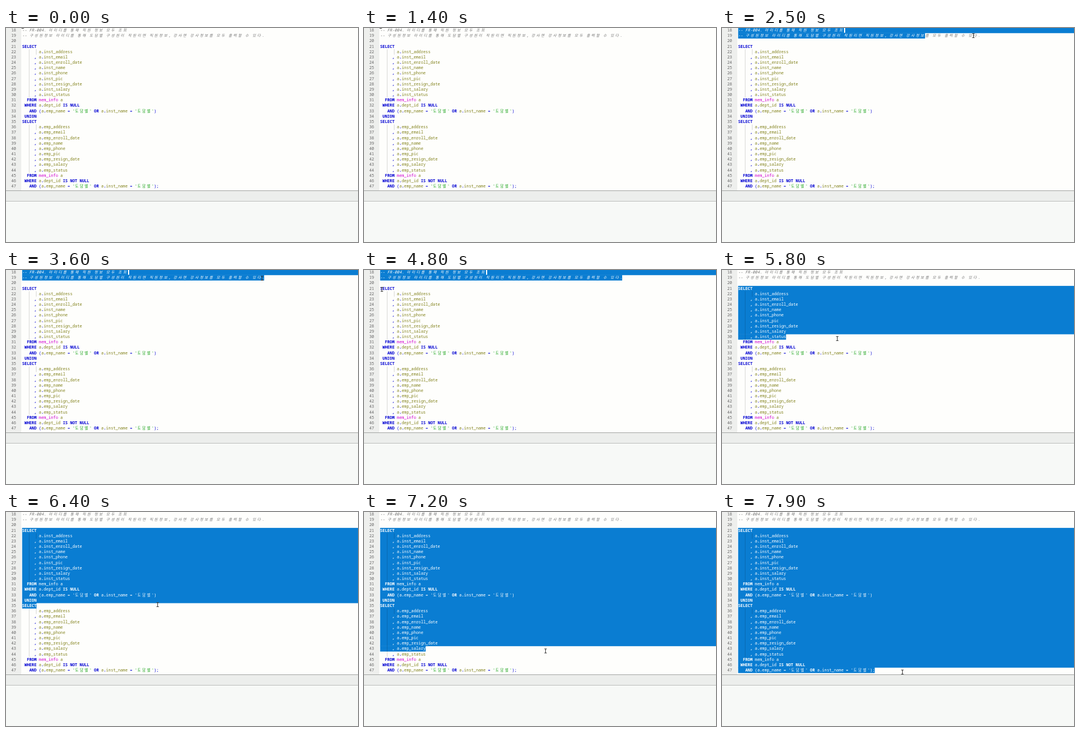
An HTML page with a canvas that plays this animation: 600 by 365 pixels, repeating every 8 s.

```html
<!DOCTYPE html>
<html lang="ko">
<head>
<meta charset="utf-8">
<style>
  html, body { margin: 0; width: 100%; height: 100%; overflow: hidden; background: #f7f9f7; }
  canvas { display: block; }
</style>
</head>
<body>
<canvas id="stage" width="600" height="365"></canvas>
<script>
const ctx = document.getElementById('stage').getContext('2d');
const LOOP = 8000, STEP = 100, LAG = 100;
const LEFT = 27.5, CELL = 4.085, TOP = -0.4, ROW = 9.17, FIRST = 18;
const BLUE = '#0a7dd2', PERSON = '도담별';
const LATIN = '6.81px "Noto Sans Mono", "DejaVu Sans Mono", monospace';
const HANGUL = '6.3px "Noto Sans CJK KR", "Noto Sans CJK", sans-serif';

const fields = ['address', 'email', 'enroll_date', 'name', 'phone', 'pic', 'resign_date', 'salary', 'status'];
const query = (prefix, test, end) => [
  'SELECT',
  ...fields.map((f, i) => `     ${i ? ',' : ' '} a.${prefix}_${f}`),
  '  FROM mem_info a',
  ` WHERE a.dept_id ${test}`,
  `   AND (a.emp_name = '${PERSON}' OR a.inst_name = '${PERSON}')${end}`
];
const source = [
  '-- FR-004. 아이디를 통해 직원 정보 모두 조회',
  `-- 구성원정보 아이디를 통해 ${PERSON} 구성원이 직원이면 직원정보, 강사면 강사정보를 모두 출력할 수 있다.`,
  '',
  ...query('inst', 'IS NULL', ''),
  ' UNION',
  ...query('emp', 'IS NOT NULL', ';')
];

const isHangul = c => c >= '가' && c <= '힣';

function tokenStyle(token) {
  if (token.startsWith('--')) return { color: '#757575', font: 'italic ' };
  if (token[0] === "'") return { color: '#12a012', font: '' };
  if (token === 'mem_info') return { color: '#d000d0', font: '' };
  if (/^[a-z_]+$/.test(token)) return { color: '#80801a', font: '' };
  return { color: '#0000d2', font: /[A-Z,.]/.test(token) ? 'bold ' : '' };
}

// Lay every character out on the cell grid; Hangul takes two cells.
function layout(text) {
  const chars = [];
  let x = LEFT;
  for (const token of text.match(/--.*|'[^']*'|\w+|\s+|./g) || []) {
    const style = tokenStyle(token);
    for (const c of token) {
      const w = isHangul(c) ? 2 * CELL : CELL;
      chars.push({ c, x, w, ...style });
      x += w;
    }
  }
  return chars;
}
const lines = source.map(layout);
const rowTop = i => TOP + i * ROW;

// Pointer path: time, x, y
const path = [
  [0, 28, -3], [1900, 28, -3], [2000, 32, 4], [2200, 130, 5], [2300, 215, 7],
  [2400, 346, 11], [2500, 428, 13], [2600, 450, 13], [2800, 458, 13], [3400, 458, 13],
  [3600, 436, 14], [4500, 40, 32], [4800, 30, 33], [5000, 30, 33], [5400, 90, 60],
  [5700, 185, 112], [5800, 196, 117], [6300, 250, 156], [6400, 258, 158],
  [7100, 303, 231], [7200, 309, 237], [7900, 307, 273], [8000, 307, 273]
];
function pointer(t) {
  const i = Math.max(1, path.findIndex(p => p[0] >= t));
  const [t0, x0, y0] = path[i - 1], [t1, x1, y1] = path[i];
  const k = (t - t0) / (t1 - t0);
  return { x: x0 + (x1 - x0) * k, y: y0 + (y1 - y0) * k };
}

function selection(t) {
  if (t < 2100) return null;
  const first = t < 5000;
  const p = pointer((first ? Math.min(t, 2800) : t) - LAG);
  const from = first ? 0 : 3;
  const to = Math.max(from, Math.min(lines.length - 1, Math.floor((p.y - TOP) / ROW)));
  let x = LEFT;
  for (const ch of lines[to]) if (p.x >= ch.x + ch.w / 2) x = ch.x + ch.w;
  return { from, to, x, first };
}

function rect(color, x, y, w, h) {
  ctx.fillStyle = color;
  ctx.fillRect(x, y, w, h);
}

function drawLine(line, i, selectedTo) {
  const y = rowTop(i) + 6.5;
  ctx.textAlign = 'center';
  for (const ch of line) {
    const mid = ch.x + ch.w / 2;
    const wide = isHangul(ch.c);
    ctx.fillStyle = mid < selectedTo ? '#fff' : ch.color;
    ctx.font = ch.font + (wide ? HANGUL : LATIN);
    ctx.fillText(ch.c, wide ? mid - 0.8 : mid, y);
  }
  ctx.font = LATIN;
  ctx.textAlign = 'right';
  ctx.fillStyle = '#646464';
  ctx.fillText(FIRST + i, 17.1, y);
}

function drawGuides() {
  for (const i of [4, 18]) {
    rect('rgba(0,0,0,.15)', 39, rowTop(i), 1, ROW * fields.length);
    rect('rgba(0,0,0,.15)', 51, rowTop(i), 1, ROW);
  }
}

function drawPointer({ x, y }) {
  x = Math.round(x);
  y = Math.round(y);
  ctx.strokeStyle = '#3a3a3a';
  ctx.lineWidth = 1;
  ctx.beginPath();
  ctx.moveTo(x - 1.5, y - 3.5);
  ctx.lineTo(x + 2.5, y - 3.5);
  ctx.moveTo(x + 0.5, y - 3.5);
  ctx.lineTo(x + 0.5, y + 3.5);
  ctx.moveTo(x - 1.5, y + 3.5);
  ctx.lineTo(x + 2.5, y + 3.5);
  ctx.stroke();
}

function draw(t) {
  rect('#fefefc', 0, 0, 600, 277);
  rect('#eeefed', 0, 0, 26, 277);
  const sel = selection(t);
  if (sel) {
    const top = rowTop(sel.from), last = rowTop(sel.to);
    rect(BLUE, LEFT, top, 600 - LEFT, last - top);
    rect(BLUE, LEFT, last - 0.5, sel.x - LEFT, ROW + 0.5);
    if (sel.first && sel.to > 0) rect('#fff', 208, 0, 2, 8);
  }
  drawGuides();
  lines.forEach((line, i) => {
    const inside = sel && i >= sel.from && i <= sel.to;
    drawLine(line, i, inside ? (i < sel.to ? 600 : sel.x) : 0);
  });
  rect('#a4a6a4', 0, 277, 600, 1);
  rect('#eceeec', 0, 278, 600, 17);
  rect('#bcbebc', 0, 295, 600, 1);
  rect('#f7f9f7', 0, 296, 600, 69);
  drawPointer(pointer(t));
}

const start = performance.now();
function tick() {
  const t = (performance.now() - start) % LOOP;
  draw(Math.floor(t / STEP) * STEP);
  requestAnimationFrame(tick);
}
tick();
</script>
</body>
</html>
```
